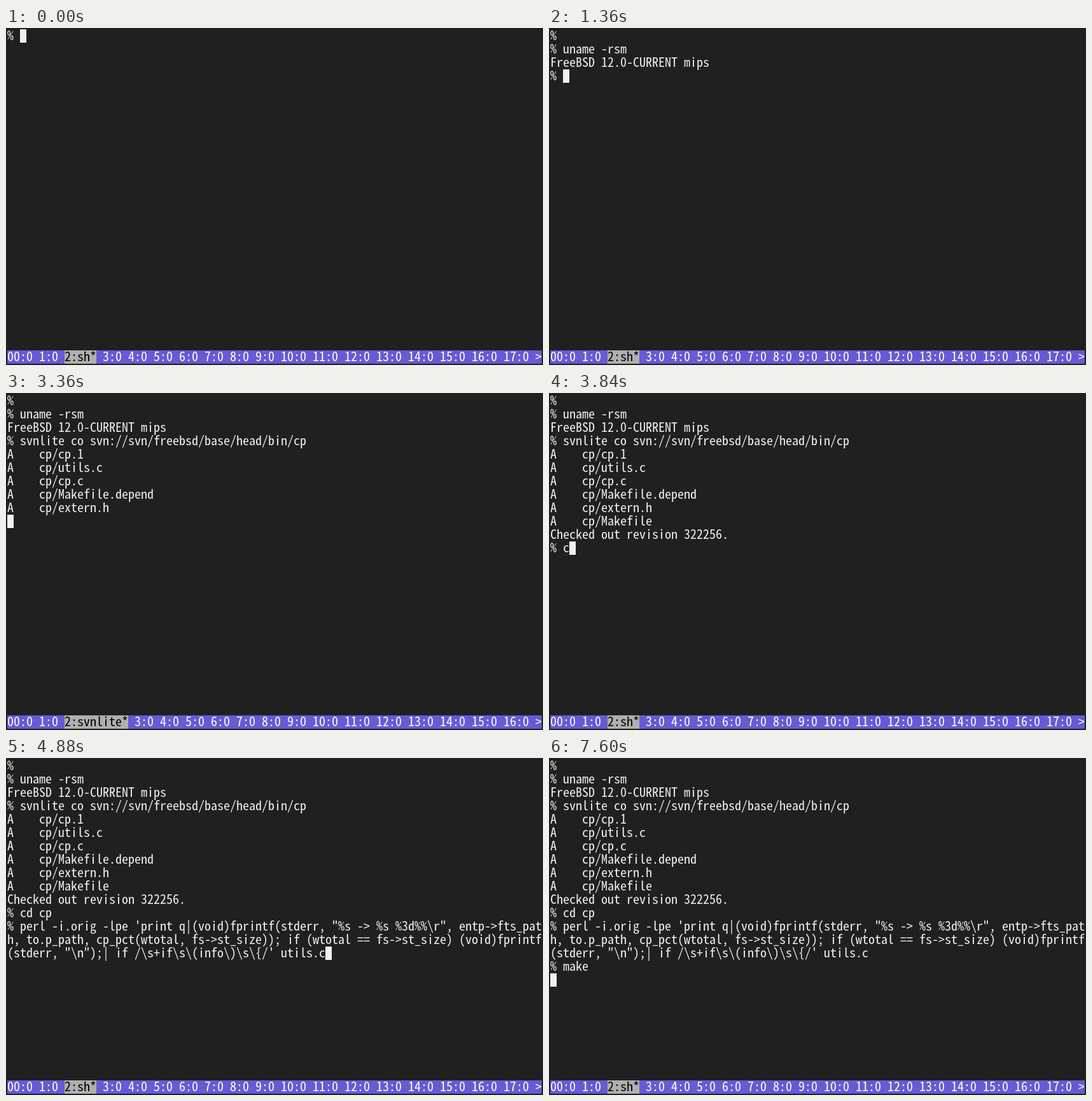
An HTML page with a canvas that plays this animation: 844 by 529 pixels, repeating every 8000 ms.

```html
<!DOCTYPE html>
<html lang="en">
<head>
<meta charset="utf-8">
<title>Terminal session</title>
<style>
html, body { margin: 0; width: 100%; height: 100%; overflow: hidden; background: #202020; }
canvas { display: block; }
</style>
</head>
<body>
<canvas id="screen" width="844" height="529"></canvas>
<script>
const LOOP = 8000, PAD = 2, CELL_W = 10, CELL_H = 21, COLS = 84, STATUS_ROW = 24;
const BG = '#202020', FG = '#f0f0f0', BAR = '#665bd4', ACTIVE = '#afafaf';
const FAMILY = '"Noto Sans Mono CJK JP", "Noto Sans Mono", monospace';
const ctx = document.getElementById('screen').getContext('2d');

// Pick the size whose advance is one cell
ctx.font = `100px ${FAMILY}`;
ctx.font = `${100 * CELL_W / ctx.measureText('0').width}px ${FAMILY}`;

const perl = String.raw`perl -i.orig -lpe 'print q|(void)fprintf(stderr, "%s -> %s %3d%%\r", entp->fts_path, to.p_path, cp_pct(wtotal, fs->st_size)); if (wtotal == fs->st_size) (void)fprintf(stderr, "\n");| if /\s+if\s\(info\)\s\{/' utils.c`;
const added = names => names.map(name => `A    cp/${name}\n`).join('');

// [time, output appended to the screen]
const output = [
  [0, '% '],
  [320, '\n% '],
  [720, 'u'], [800, 'na'], [880, 'me'], [960, ' '], [1040, '-r'], [1120, 'sm'],
  [1360, '\nFreeBSD 12.0-CURRENT mips\n% '],
  [2160, 'sv'], [2240, 'nli'], [2320, 'te '],
  [2480, 'co'], [2560, ' '],
  [2720, 'svn://svn/freebsd'], [2800, '/base/head/bin/cp'],
  [2960, '\n'],
  [3360, added(['cp.1', 'utils.c', 'cp.c', 'Makefile.depend', 'extern.h'])],
  [3440, added(['Makefile'])],
  [3520, 'Checked out revision 322256.\n% '],
  [3840, 'c'], [4000, 'd '], [4160, 'c'], [4240, 'p'],
  [4400, '\n% '],
  [4880, perl],
  [6160, '\n% '],
  [6800, 'm'], [6880, 'ak'], [6960, 'e'],
  [7600, '\n']
];

function block(col, row, width, color) {
  ctx.fillStyle = color;
  ctx.fillRect(PAD + col * CELL_W, PAD + row * CELL_H, width * CELL_W, CELL_H);
}

function write(text, col, row, color) {
  ctx.fillStyle = color;
  for (const ch of text) {
    if (ch === '\n' || col === COLS) {
      col = 0;
      row++;
    }
    if (ch !== '\n') {
      ctx.fillText(ch, PAD + col * CELL_W, PAD + row * CELL_H + 17);
      col++;
    }
  }
  return [col, row];
}

function drawStatus(command) {
  const active = `2:${command}*`;
  let line = `00:0 1:0 ${active}`;
  for (let n = 3; line.length < COLS; n++) line += ` ${n}:0`;
  line = line.slice(0, COLS - 2).replace(/ \d+:?$/, '').padEnd(COLS - 1) + '>';
  block(0, STATUS_ROW, COLS, BAR);
  write(line, 0, STATUS_ROW, '#fff');
  block(9, STATUS_ROW, active.length, ACTIVE);
  write(active, 9, STATUS_ROW, '#000');
}

function draw(now) {
  const t = now % LOOP;
  ctx.fillStyle = BG;
  ctx.fillRect(0, 0, 844, 529);
  const text = output.filter(([time]) => time <= t).map(([, part]) => part).join('');
  const [col, row] = write(text, 0, 0, FG);
  block(col, row, 1, FG);
  drawStatus(t >= 3360 && t < 3840 ? 'svnlite' : 'sh');
  requestAnimationFrame(draw);
}

requestAnimationFrame(draw);
</script>
</body>
</html>
```
